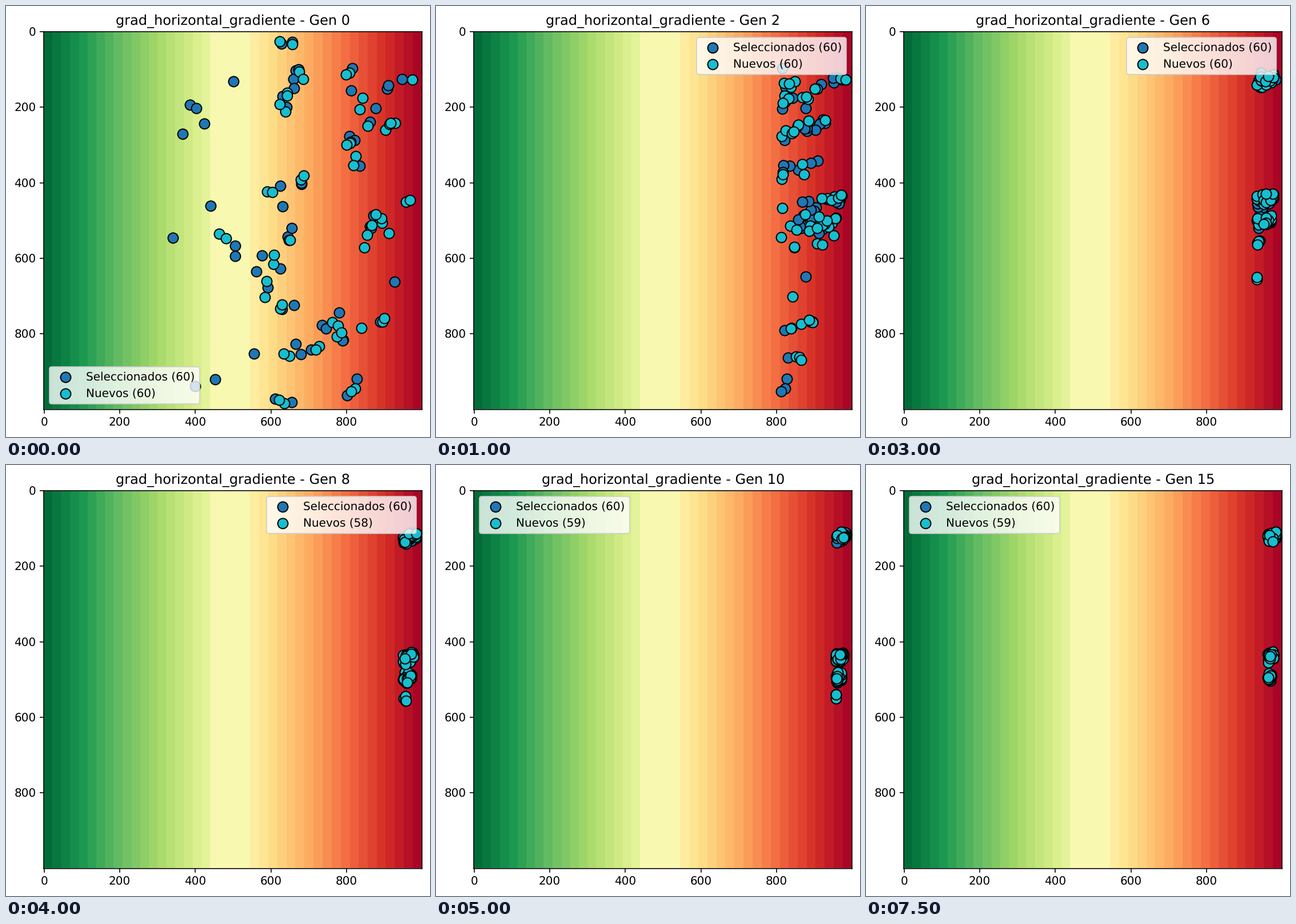
Write a matplotlib script that moves like this. It is 742 px wide and 755 px high and loops after 8000 ms.

```python
import numpy as np
import matplotlib.pyplot as plt
from matplotlib.animation import FuncAnimation

W, H, DPI = 742, 755, 144
LEFT, TOP, SIDE = 66.3, 44.8, 661.7
SIZE, POP = 1000, 60
COUNTS = [60, 60, 60, 60, 59, 59, 60, 59, 58, 60, 59, 60, 58, 59, 60, 59]
GENS = len(COUNTS)

# Promising rows: y, largest reachable x, share of the offspring
RIDGES = np.array([
    (118, 985, 5), (234, 930, 4), (342, 932, 2), (435, 978, 4.5),
    (492, 971, 5), (545, 958, 0.7), (655, 933, 0.6), (764, 903, 2),
    (850, 880, 1.2)])

# Centres of the first generation's loose groups
HUBS = np.array([
    (640, 35), (680, 118), (640, 165), (645, 205), (810, 110), (798, 290),
    (820, 340), (690, 390), (600, 422), (478, 538), (640, 543), (615, 615),
    (600, 682), (630, 718), (765, 770), (775, 798), (725, 830), (650, 865),
    (808, 955), (630, 978)])

plt.rcParams.update({"font.family": "DejaVu Sans", "font.size": 10,
                     "text.hinting": "none"})


def floor(g):
    """Smallest x that still survives in generation g."""
    return 963 - 151 * np.exp(-0.4 * (g - 2))


def on_ridges(n, low, rng):
    """Points between low and the peak of each ridge, looser further down."""
    alive = RIDGES[RIDGES[:, 1] > low]
    share = alive[:, 2] / alive[:, 2].sum()
    y, peak, _ = alive[rng.choice(len(alive), n, p=share)].T
    depth = (peak - low) * rng.random(n)
    y = y + 0.35 * depth + rng.normal(0, 5 + 0.12 * depth)
    return np.column_stack([peak - depth, y])


def near_hubs(spread, rng):
    centres = np.repeat(HUBS, 2, axis=0)
    points = centres + rng.normal(0, spread, centres.shape)
    return np.clip(points, 0, SIZE - 5)


def survivors(points, low):
    """Best x first, thinned evenly to the population size."""
    ranked = points[np.argsort(-points[:, 0])]
    fit = max(POP, (points[:, 0] >= low).sum())
    return ranked[np.linspace(0, fit - 1, POP).astype(int)]


def evolve():
    rng = np.random.default_rng(12)
    loners = rng.uniform((340, 20), (580, 990), (10, 2))
    chosen = np.vstack([near_hubs(25, rng), on_ridges(10, 830, rng), loners])
    new = np.vstack([near_hubs(10, rng), on_ridges(20, 830, rng)])
    history = [(chosen, new)]
    for g in range(1, GENS):
        chosen = survivors(np.vstack([chosen, new]), floor(g))
        new = on_ridges(COUNTS[g], floor(g), rng)
        history.append((chosen, new))
    return history


def banded_gradient():
    """One row of colours: even bands with a wide pale one in the middle."""
    t = np.r_[np.linspace(0, 0.44, 20), np.linspace(0.546, 1, 20)]
    cmap = plt.get_cmap("RdYlGn_r")
    colors = np.array([cmap(np.linspace(a, b, 24)).mean(axis=0)
                       for a, b in zip(t[:-1], t[1:])])
    x = (np.arange(SIZE) + 0.5) / SIZE
    return colors[np.searchsorted(t, x) - 1][None]


history = evolve()

fig = plt.figure(figsize=(W / DPI, H / DPI), dpi=DPI, facecolor="white")
ax = fig.add_axes([LEFT / W, 1 - (TOP + SIDE) / H, SIDE / W, SIDE / H])
box = (-0.5, SIZE - 0.5, SIZE - 0.5, -0.5)
ax.imshow(banded_gradient(), extent=box, aspect="auto", interpolation="nearest")


def dots(color):
    return ax.scatter([], [], s=80, c=color, edgecolors="black", linewidths=1)


selected, fresh = dots("tab:blue"), dots("tab:cyan")
ax.set(xlim=box[:2], ylim=box[2:],
       xticks=range(0, SIZE, 200), yticks=range(0, SIZE, 200))


def legend_place(g):
    if g == 0:
        return "lower left"
    return "upper right" if 2 <= g <= 8 else "upper left"


def update(g):
    old, new = history[g]
    selected.set_offsets(old)
    fresh.set_offsets(new)
    ax.set_title(f"grad_horizontal_gradiente - Gen {g}", fontsize=12)
    ax.legend([selected, fresh],
              [f"Seleccionados ({POP})", f"Nuevos ({COUNTS[g]})"],
              loc=legend_place(g), fontsize=10)
    return selected, fresh


anim = FuncAnimation(fig, update, frames=GENS, interval=500,
                     repeat=True, repeat_delay=0, blit=False)
plt.show()
```
